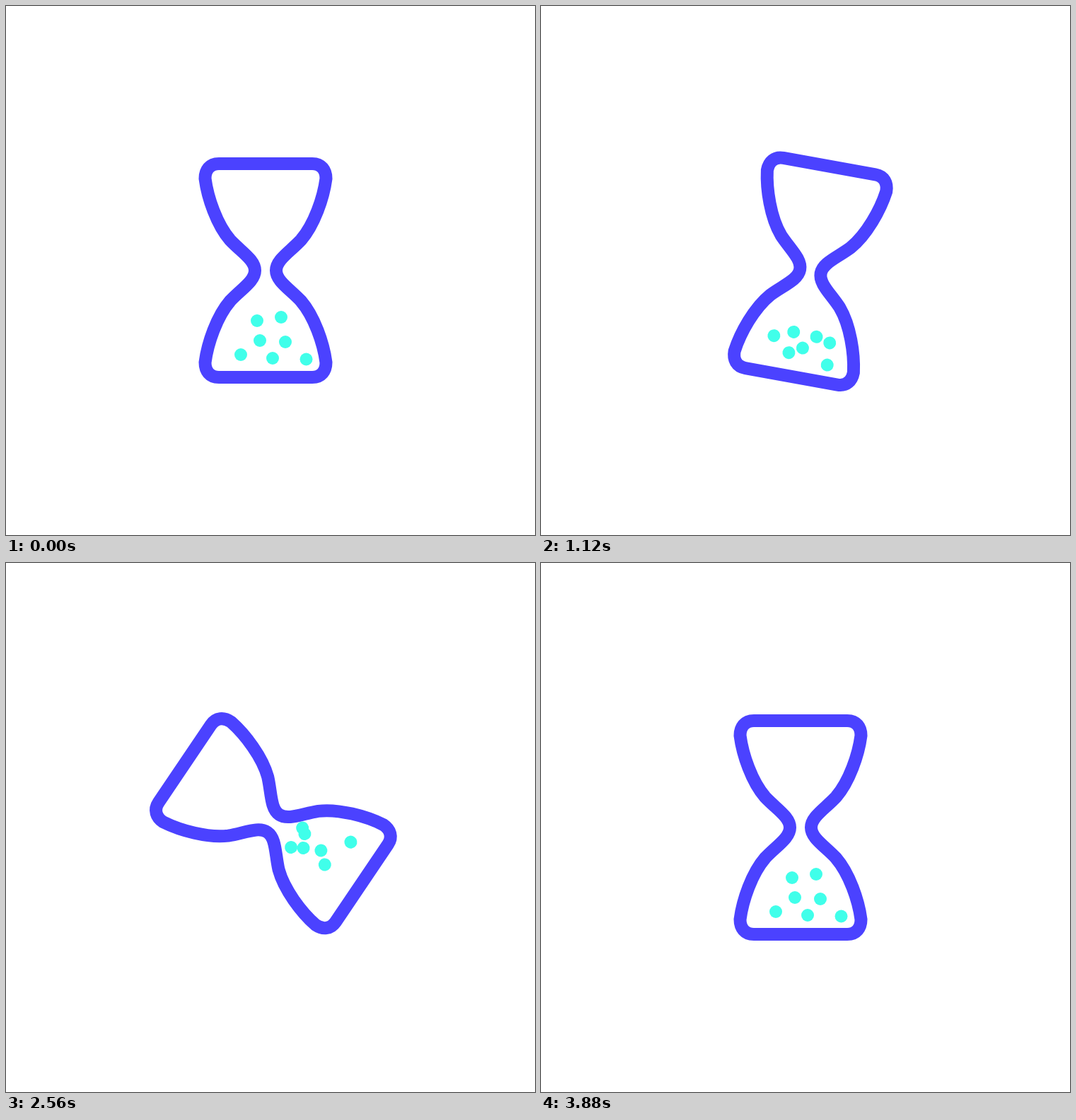
Recreate the animation shown at these times as an HTML page with a canvas. Size 748 px wide and 748 px high, loop 4.4 s.

```html
<!DOCTYPE html>
<html>
<head>
<meta charset="utf-8">
<title>Hourglass</title>
<style>
  html, body { margin: 0; width: 100%; height: 100%; overflow: hidden; background: #fff; }
  canvas { display: block; }
</style>
</head>
<body>
<canvas id="stage" width="748" height="748"></canvas>
<script>
const ctx = document.getElementById('stage').getContext('2d');
const LOOP = 4400, STEP = 40, SECOND = 2280, FALL = 430;
const NECK = [-7, 0];

// Outline around the centre of the glass.
const glass = new Path2D(`M -66 -151
  C -79 -151 -85.5 -142 -85.5 -130 C -82 -103 -69 -65 -50 -43
  C -34 -26 -15 -15 -15 0 C -15 15 -34 26 -50 43
  C -69 65 -82 103 -85.5 130 C -85.5 142 -79 151 -66 151 L 66 151
  C 79 151 85.5 142 85.5 130 C 82 103 69 65 50 43
  C 34 26 15 15 15 0 C 15 -15 34 -26 50 -43
  C 69 -65 82 -103 85.5 -130 C 85.5 -142 79 -151 66 -151 Z`);

// Resting places in both chambers, in the order the grains first reach the neck.
const grains = [
  { home: [-19, 71], away: [-54, -126] },
  { home: [15, 66], away: [2.5, -118.5] },
  { home: [-15, 99], away: [-15.5, -108.5] },
  { home: [50.5, 125.5], away: [1, -88.5] },
  { home: [21, 101], away: [-32, -89.5] },
  { home: [-42, 119], away: [-53, -97] },
  { home: [3, 124], away: [36, -123] }
];

const mix = (a, b, k) => a.map((v, i) => v + (b[i] - v) * k);

// A grain speeds up towards the neck, then drops evenly to its place.
function pour(from, to, t, neckTime) {
  if (t < neckTime) return mix(from, NECK, (t / neckTime) ** 1.75);
  return mix(NECK, to, Math.min(1, (t - neckTime) / FALL));
}

// The last grain in is the first one out on the way back.
function grainAt({ home, away }, i, t) {
  if (t < SECOND) return pour(home, away, t, 325 + 75 * i);
  return pour(away, home, t - SECOND, 350 + 21 * (6 - i) ** 1.7);
}

// Cubic bezier (x1, 0, 2/3, 1), solved by bisection.
function ease(x, x1 = 1 / 3) {
  if (x <= 0) return 0;
  if (x >= 1) return 1;
  let lo = 0, hi = 1, s;
  for (let i = 0; i < 24; i++) {
    s = (lo + hi) / 2;
    const r = 1 - s;
    if (3 * r * r * s * x1 + 2 * r * s * s + s * s * s < x) lo = s;
    else hi = s;
  }
  return s * s * (3 - 2 * s);
}

// Half turn with a 15 degree overshoot.
const turn = (t, x1) => 195 * ease(t / 1000, x1) - 15 * ease((t - 1000) / 320);
const angleAt = t => t < SECOND ? turn(t, 1 / 3) : 180 - turn(t - SECOND, 1 / 6);

function draw(t) {
  ctx.setTransform(1, 0, 0, 1, 0, 0);
  ctx.fillStyle = '#fff';
  ctx.fillRect(0, 0, 748, 748);
  ctx.translate(374, 374);
  ctx.rotate(angleAt(t) * Math.PI / 180);

  ctx.save();
  ctx.translate(...NECK);
  ctx.strokeStyle = '#4b42ff';
  ctx.lineWidth = 18;
  ctx.stroke(glass);
  ctx.restore();

  ctx.fillStyle = '#40ffea';
  grains.forEach((grain, i) => {
    ctx.beginPath();
    ctx.arc(...grainAt(grain, i, t), 9, 0, 2 * Math.PI);
    ctx.fill();
  });
}

const origin = performance.now();
function tick() {
  const t = (performance.now() - origin) % LOOP;
  draw(Math.floor(t / STEP) * STEP);
  requestAnimationFrame(tick);
}
tick();
</script>
</body>
</html>
```
